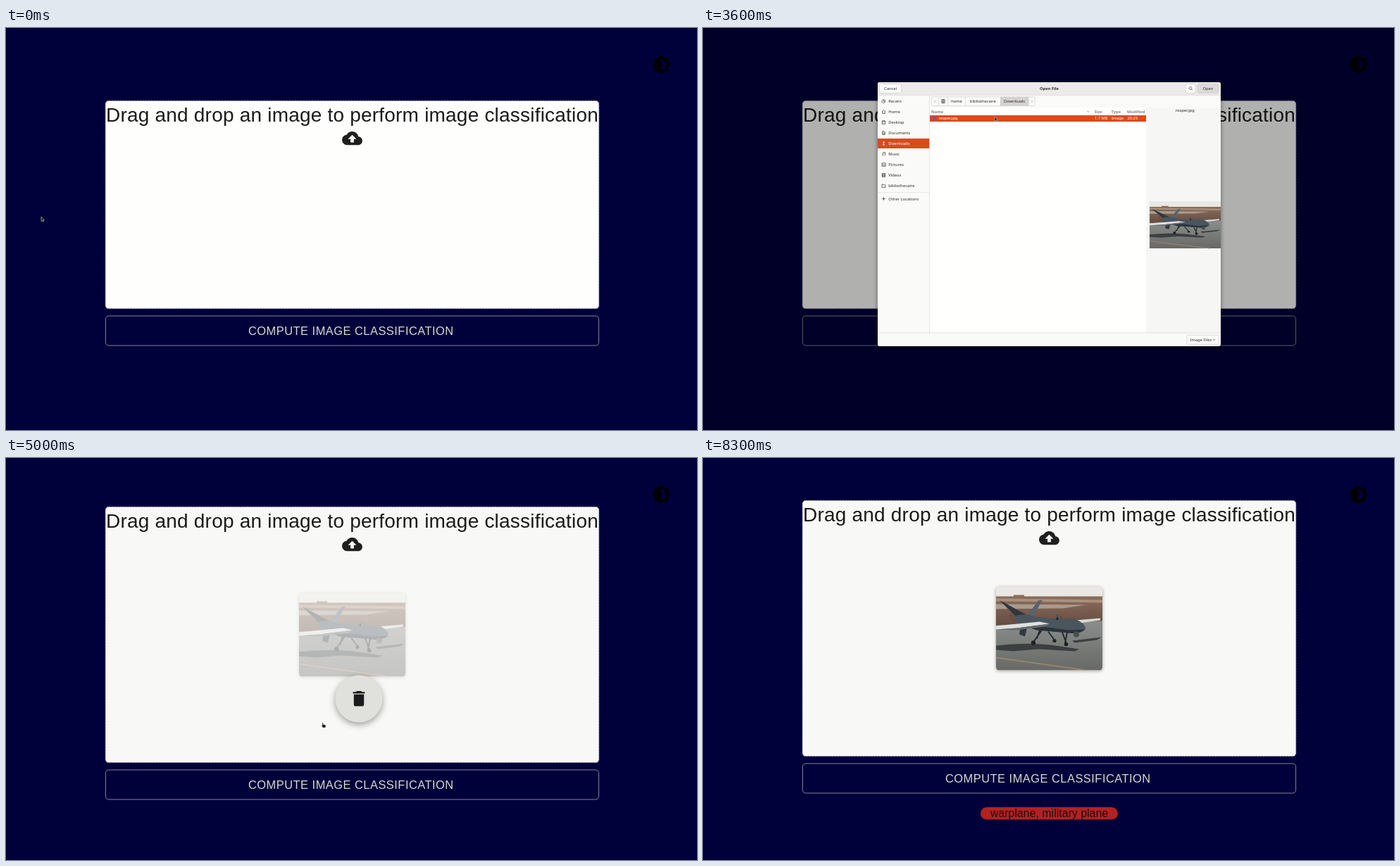
Recreate the animation shown at these times as an HTML page. Size 981 by 571 pixels, loop 9.3 s.

```html
<!DOCTYPE html>
<html lang="en">
<head>
<meta charset="utf-8">
<title>Image classification</title>
<style>
html, body { margin: 0; width: 100%; height: 100%; overflow: hidden; background: #00003a; }
svg { display: block; width: 100%; height: 100%; }
.page text { font-family: "Liberation Sans", Arial, sans-serif; }
.dialog text { font: 5.75px "Noto Sans", "Open Sans", sans-serif; fill: #2c2c2c; }
.dialog .light { fill: #fff; }
.dialog .grey { fill: #858585; font-weight: 600; }
.dialog .bold { font-weight: 700; }
.icon { fill: none; stroke: #444; stroke-width: .8; }
</style>
</head>
<body>
<svg id="stage" viewBox="0 0 981 571" xmlns="http://www.w3.org/2000/svg">
  <defs>
    <linearGradient id="tarmac" x2="0" y2="1">
      <stop offset="0" stop-color="#8a8e8c"/><stop offset="1" stop-color="#686966"/>
    </linearGradient>
    <linearGradient id="soil" x2="0" y2="1">
      <stop offset="0" stop-color="#8d6f5e"/><stop offset="1" stop-color="#644c40"/>
    </linearGradient>
    <clipPath id="round"><rect width="151" height="119" rx="4.5"/></clipPath>
    <g id="photo">
      <rect width="151" height="119" fill="#e9e8e4"/>
      <path d="M0 14H25V12H40V14H151V56H0Z" fill="url(#soil)"/>
      <path d="M0 17L151 19V23L0 21Z" fill="#aa8f7c"/>
      <path d="M0 25L128 26 95 31 0 32Z" fill="#a89a8e"/>
      <path d="M0 55L151 49V119H0Z" fill="url(#tarmac)"/>
      <path d="M0 84Q40 79 78 83L118 89 112 92 60 89 24 92 0 90ZM108 77L150 72 143 76 112 80Z" fill="#3b3f40"/>
      <path d="M0 101L128 119" stroke="#a08a6c" stroke-width="1.5"/>
      <ellipse cx="31" cy="43" rx="13" ry="8" fill="#6b4c40" opacity=".6"/>
      <path d="M5 20L10 22 46 42 40 50 32 46Z" fill="#30373d"/>
      <path d="M60 20L66 19 54 40 43 43Z" fill="#56636e"/>
      <path d="M35 55L45 55 41 71 33 68Z" fill="#30383f"/>
      <path d="M112 48L148 45V48L118 52Z" fill="#d8d9d8"/>
      <path d="M27 42Q42 37 56 43L92 47Q110 42 121 51 129 57 126 62 118 68 103 66L58 62 31 53Z" fill="#4b555e"/>
      <path d="M31 53L58 56 103 62 126 61Q118 68 103 66L58 62Z" fill="#2c333a"/>
      <path d="M85 47L87 41 89 47M92 47V42" stroke="#454e56" stroke-width="1.6"/>
      <path d="M0 56L62 50 76 53 30 59 0 61Z" fill="#dfe1e0"/>
      <path d="M0 61L30 59 76 53 70 57 28 62Z" fill="#646b6e"/>
      <path d="M65 62L53 79M62 62L58 74M74 64L83 76M94 65L100 81M101 65L98 80" stroke="#262b2f" stroke-width="2"/>
      <g fill="#1e2326"><circle cx="53" cy="80" r="3.2"/><circle cx="83" cy="77" r="2.6"/><circle cx="99.5" cy="82" r="2.8"/></g>
      <circle cx="114" cy="68" r="4" fill="#4b4f4f"/>
    </g>
  </defs>

  <g class="page">
    <rect width="981" height="571" fill="#00003a"/>
    <path transform="translate(916.1 37.4) scale(1.2)" d="M20 8.69V6c0-1.1-.9-2-2-2h-2.69l-1.9-1.9c-.78-.78-2.05-.78-2.83 0L8.69 4H6c-1.1 0-2 .9-2 2v2.69l-1.9 1.9c-.78.78-.78 2.05 0 2.83l1.9 1.9V18c0 1.1.9 2 2 2h2.69l1.9 1.9c.78.78 2.05.78 2.83 0l1.9-1.9H18c1.1 0 2-.9 2-2v-2.69l1.9-1.9c.78-.78.78-2.05 0-2.83L20 8.69zM12 18c-.89 0-1.74-.2-2.5-.55C11.56 16.5 13 14.42 13 12s-1.44-4.5-3.5-5.45C10.26 6.2 11.11 6 12 6c3.31 0 6 2.69 6 6s-2.69 6-6 6z"/>
    <g id="zone">
      <rect id="area" x="141.2" y=".4" width="700.6" rx="4.5" stroke="#b4b4bc" stroke-width=".8" stroke-dasharray="2.4 1.6"/>
      <text x="142" y="30" font-size="28" letter-spacing=".206" fill="#1b1b1b">Drag and drop an image to perform image classification</text>
      <path transform="translate(477.1 39.2) scale(1.2)" fill="#1f1f1f" d="M19.35 10.04C18.67 6.59 15.64 4 12 4 9.11 4 6.6 5.64 5.35 8.04 2.34 8.36 0 10.91 0 14c0 3.31 2.69 6 6 6h13c2.76 0 5-2.24 5-5 0-2.64-2.05-4.78-4.65-4.96zM14 13v4h-4v-4H7l5-5 5 5h-3z"/>
      <g id="upload" style="filter:drop-shadow(0 1px 2.5px rgba(0,0,0,.35))">
        <g transform="translate(416 122.5)" clip-path="url(#round)"><use href="#photo"/></g>
      </g>
      <g id="trash">
        <circle cx="501" cy="273" r="33.5" fill="#e0e0dc" style="filter:drop-shadow(0 3px 5px rgba(0,0,0,.38))"/>
        <path transform="translate(486.6 258.4) scale(1.2)" fill="#1b1b1b" d="M6 19c0 1.1.9 2 2 2h8c1.1 0 2-.9 2-2V7H6v12zM19 4h-3.5l-1-1h-5l-1 1H5v2h14V4z"/>
      </g>
    </g>
    <g id="button">
      <rect id="face" x="141.4" y=".4" width="700.2" height="42" rx="4.5" fill="#e0e0dc" fill-opacity="0" stroke="#85859a"/>
      <text x="344" y="27.5" font-size="16.47" letter-spacing=".47" fill="#d8d8d2">COMPUTE IMAGE CLASSIFICATION</text>
    </g>
    <circle id="spinner" cx="491.5" cy="504.5" r="22" fill="none" stroke="#d8d8d2" stroke-width="3.9"/>
    <g id="chip">
      <rect x="394" y="496" width="195" height="17.6" rx="8.8" fill="#b2221f"/>
      <text x="408" y="510.2" font-size="15.6" letter-spacing=".146" fill="#190d0d">warplane, military plane</text>
    </g>
  </g>
  <rect id="dim" width="981" height="571"/>
  <g id="dialog" class="dialog"></g>
  <path id="arrow" d="M0 0V6.4L1.5 5.1 2.5 7.4 3.5 6.9 2.5 4.7H4.4Z" fill="#151515" stroke="#d5d5d5" stroke-width=".6"/>
  <path id="hand" d="M1.1 .3Q1.8 -.2 2.3 .5V2.6L5.4 3.2 6 4 5.3 6.9H1.9L0 4.2 .5 3.6 1.2 4Z" fill="#1c1c1c" stroke="#d5d5d5" stroke-width=".3"/>
</svg>
<script>
const LOOP = 9300, STEP = 100;
const $ = id => document.getElementById(id);
const set = (id, attrs) => { for (const k in attrs) $(id).setAttribute(k, attrs[k]); };
const show = (id, on) => set(id, { visibility: on ? 'visible' : 'hidden' });
const clamp = v => Math.min(1, Math.max(0, v));
const ramp = (t, a, b) => clamp((t - a) / (b - a));
const within = (t, a, b) => t >= a && t < b;

const box = (x, y, w, h, fill, more = '') => `<rect x="${x}" y="${y}" width="${w}" height="${h}" fill="${fill}" ${more}/>`;
const label = (x, y, s, cls = '', anchor = 'start') => `<text x="${x}" y="${y}" class="${cls}" text-anchor="${anchor}">${s}</text>`;
const frame = (x, y, w, h, fill, id = '') => box(x, y, w, h, fill, `id="${id}" rx="2" stroke="#cfcdca" stroke-width=".7"`);
const icon = (x, y, d, color = '#444') => `<path class="icon" style="stroke:${color}" transform="translate(${x} ${y})" d="${d}"/>`;

function buildDialog() {
  const folder = 'M0 5V.7H2L2.6 1.5H5V5Z';
  const places = [
    ['Recent', 'M2.5 .2A2.4 2.4 0 1 1 2.4 .2M2.5 1V2.8H4'],
    ['Home', 'M0 2.7L2.5 .3 5 2.7M.8 2.3V5H4.2V2.3'],
    ['Desktop', 'M.3 .5H4.7V5H.3ZM.3 1.2H4.7'],
    ['Documents', 'M.7 .2H3L4.4 1.6V5H.7ZM1.6 2.5H3.5M1.6 3.7H3.5'],
    ['Downloads', 'M2.5 0V5.2M1 3.7L2.5 5.2 4 3.7M1.2 1.5L2.5 0 3.8 1.5'],
    ['Music', 'M1.5 4.3V.6L4.6 .2V3.9M.3 4.6H1.5M3.4 4.2H4.6'],
    ['Pictures', 'M0 .5H5V5H0ZM.6 4L2 2.4 3 3.5 3.7 2.8 4.6 4'],
    ['Videos', 'M.3 .3H4.7V5H.3ZM1.3 .3V5M3.7 .3V5M1.3 2.6H3.7'],
    ['bibliothecaire', folder]
  ];
  let s = box(248, 77, 487, 375, '#fafaf9', 'rx="3" style="filter:drop-shadow(0 1px 3px rgba(0,0,0,.45))"');
  s += '<path d="M248 95V80Q248 77 251 77H732Q735 77 735 80V95Z" fill="#ebeae9"/>';
  s += box(248, 95, 487, .6, '#d3d1ce') + box(321.3, 95, .6, 338, '#dad9d7');
  s += box(322, 113, 307, 320, '#fffffe') + box(629, 113, 106, 320, '#f6f6f5') + box(248, 432.7, 487, .6, '#d3d1ce');
  s += frame(250.5, 79.5, 31, 13, '#fbfbfa') + label(266, 87.8, 'Cancel', '', 'middle');
  s += label(491.5, 87.8, 'Open File', 'bold', 'middle');
  s += frame(685.5, 79.5, 13.5, 13, '#fbfbfa') + icon(690, 83.5, 'M2 0A1.9 1.9 0 1 1 1.9 0M3.3 3.3L4.9 4.9');
  s += frame(702, 79.5, 30, 13, '#fbfbfa', 'open') + label(717, 87.8, 'Open', '', 'middle');

  s += box(248, 157, 73.3, 14, '#da4a1f');
  places.forEach(([name, d], i) => {
    const y = 104 + 15 * i, on = name === 'Downloads';
    s += icon(254, y - 2.6, d, on ? '#fff' : '#444') + label(263.3, y + 2, name, on ? 'light' : '');
  });
  s += box(248, 233, 73, .6, '#dad9d7') + icon(254, 240, 'M2.5 0V5M0 2.5H5') + label(263.3, 244.6, 'Other Locations');

  s += frame(324.3, 97.8, 147, 12.8, '#fafaf9') + box(422, 97.8, 40, 12.8, '#d5d3d1');
  for (const x of [334, 347.5, 372.5, 422, 462]) s += box(x, 97.8, .6, 12.8, '#cfcdca');
  s += icon(328, 102.3, 'M2 0L.3 1.9 2 3.8', '#aaa') + icon(465.8, 102.3, 'M.3 0L2 1.9 .3 3.8', '#aaa');
  s += icon(338.5, 101.5, 'M.4 0H4.6V5H.4ZM.4 2.6H4.6M1.5 1.3H3.5M1.5 3.8H3.5');
  s += label(360, 106, 'home', '', 'middle') + label(397.3, 106, 'bibliothecaire', '', 'middle') + label(442, 106, 'Downloads', '', 'middle');

  const columns = [[324, 'Name', 334.5, 'reaper.jpg'], [555.5, 'Size', 556, '1.7 MB'], [579.5, 'Type', 580, 'Image'], [602, 'Modified', 602.5, '20:25']];
  s += box(322, 124, 307, 9, '#da4a1f') + box(325.6, 126, 5.2, 4.8, '#8b46b8', 'rx=".8"');
  for (const [x, head, vx, value] of columns) s += label(x, 120.6, head, 'grey') + label(vx, 130.4, value, 'light');
  s += icon(545, 117.8, 'M0 0L1.8 1.7 3.6 0', '#888');

  s += label(684.3, 119.4, 'reaper.jpg', '', 'middle');
  s += '<use href="#photo" transform="translate(634 246) scale(.669 .563)"/>';
  s += frame(687, 436.2, 45, 13, '#fbfbfa') + label(691.5, 444.6, 'Image Files') + icon(723.6, 441.8, 'M0 0L1.8 1.7 3.6 0');
  $('dialog').innerHTML = s;
}

// time, x, y of the pointer
const track = [
  [500, 50, 268], [600, 150, 255], [700, 360, 225], [800, 530, 198], [900, 518, 196], [1000, 518, 196],
  [1300, 488, 191], [2500, 488, 191], [2600, 481, 187], [2700, 481, 187], [2900, 426, 137], [3000, 426, 137],
  [3200, 414, 126], [4400, 414, 126], [4500, 424, 165], [4700, 461, 307], [4900, 461, 307],
  [5000, 448, 376], [5200, 442, 450], [5500, 440, 468], [7700, 440, 468],
  [7800, 460, 415], [8000, 600, 250], [8200, 800, 187], [8300, 1000, 160]
];

function pointer(t) {
  const i = track.findIndex(k => k[0] >= t);
  if (i < 0) return track[track.length - 1].slice(1);
  if (i === 0) return track[0].slice(1);
  const [a, ax, ay] = track[i - 1], [b, bx, by] = track[i], p = ramp(t, a, b);
  return [ax + (bx - ax) * p, ay + (by - ay) * p];
}

// cubic-bezier(.42, 0, .58, 1)
function easeInOut(x) {
  let lo = 0, hi = 1, u = .5;
  for (let i = 0; i < 20; i++) {
    u = (lo + hi) / 2;
    if (1.26 * u * (1 - u) ** 2 + 1.74 * u * u * (1 - u) + u ** 3 < x) lo = u; else hi = u;
  }
  return u * u * (3 - 2 * u);
}

function spin(t) {
  const phase = ((t - 5800) / 1400) % 1, unit = 22 / 20.2;
  const grow = easeInOut(clamp(phase * 2)), slide = easeInOut(clamp(phase * 2 - 1));
  set('spinner', {
    transform: `rotate(${360 * phase} 491.5 504.5)`,
    'stroke-dasharray': `${(1 + 99 * grow) * unit} ${200 * unit}`,
    'stroke-dashoffset': -(15 * grow + 110 * slide) * unit
  });
}

function draw(t) {
  const loaded = t >= 3900, busy = within(t, 5800, 7300), done = t >= 7300;
  const top = !loaded ? 103 : busy ? 45 : done ? 60 : 69;
  const height = loaded ? 364 : 296;
  set('zone', { transform: `translate(0 ${top})` });
  set('area', { height: height - .8, fill: loaded ? '#f8f8f6' : '#fefefd' });
  set('button', { transform: `translate(0 ${top + height + 9.6})` });

  const fade = ramp(t, 3900, 4075) - ramp(t, 5200, 5500) + ramp(t, 7850, 8025) - ramp(t, 8125, 8300);
  show('upload', loaded);
  set('upload', { opacity: 1 - .65 * fade });
  show('trash', within(t, 3900, 5200) || within(t, 7900, 8200));
  set('face', { 'fill-opacity': within(t, 5200, 5800) || within(t, 7500, 7800) ? .07 : 0 });

  show('spinner', busy);
  if (busy) spin(t);
  show('chip', done);

  const modal = within(t, 2000, 3800);
  set('dim', { opacity: .31 * (ramp(t, 2000, 2300) - ramp(t, 3790, 4100)) });
  show('dialog', modal);
  set('open', { fill: t >= 3600 ? '#dcdad8' : '#fbfbfa' });

  const [x, y] = pointer(t);
  const link = within(t, 700, 2000) || within(t, 3800, 5800) || within(t, 7500, 8300);
  for (const id of ['arrow', 'hand']) set(id, { transform: `translate(${x} ${y})` });
  show('arrow', !link);
  show('hand', link);
}

buildDialog();
const start = performance.now();
function tick() {
  const t = (performance.now() - start) % LOOP;
  draw(Math.floor(t / STEP) * STEP);
  requestAnimationFrame(tick);
}
tick();
</script>
</body>
</html>
```
